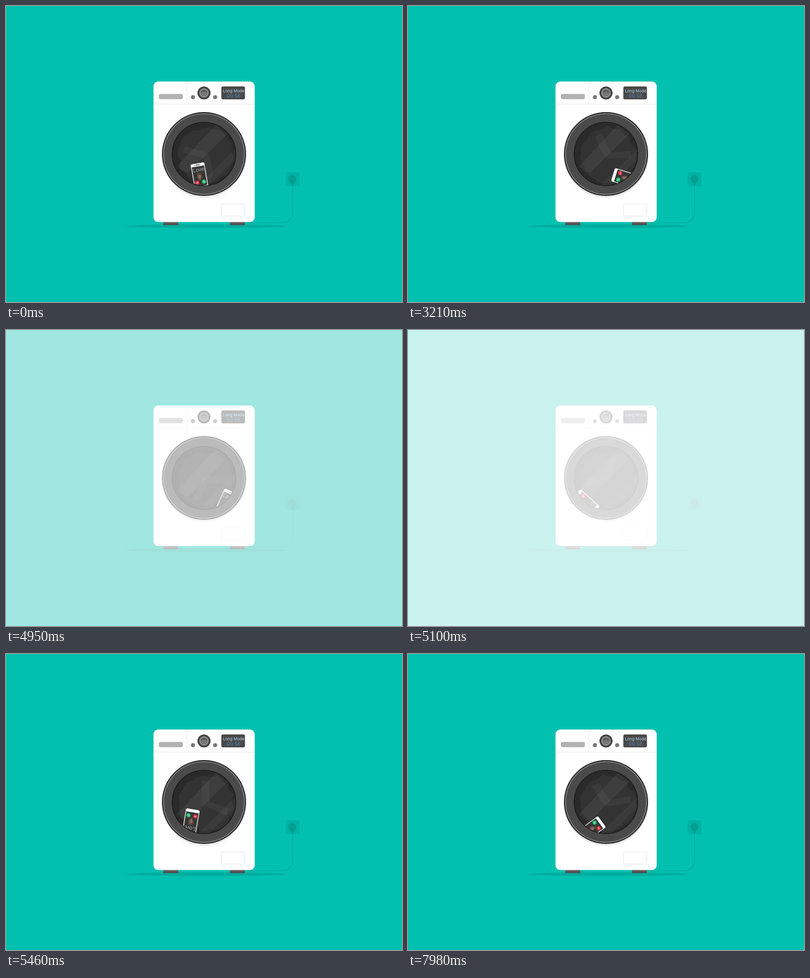
Animation of 800 by 600 pixels, one loop 8 s. Source, as an HTML page without scripts:

```html
<!DOCTYPE html>
<html lang="en">
<head>
<meta charset="utf-8">
<title>Phone in the wash</title>
<style>
  html, body { margin: 0; width: 100%; height: 100%; overflow: hidden; background: #01c0b0; }
  svg { display: block; width: 100vw; height: 100vh; }
  text { font-family: Inter, Roboto, sans-serif; }

  .slide, .spin, .cloth, .fade { animation: 8s linear infinite; }
  .slide { animation-name: slide; animation-timing-function: ease-in-out; }
  .spin { animation-name: spin; }
  .cloth { animation-name: cloth; }
  .fade { animation-name: fade; }

  @keyframes slide {
    0% { transform: translate(391px, 344.6px); }
    10.5% { transform: translate(425px, 350px); }
    19% { transform: translate(387px, 349px); }
    23.625% { transform: translate(433px, 350px); }
    27% { transform: translate(439px, 350px); }
    34% { transform: translate(395px, 349px); }
    40.125% { transform: translate(439px, 349.2px); }
    42.5% { transform: translate(442px, 349px); }
    48% { transform: translate(415px, 346px); }
    51% { transform: translate(432px, 348px); }
    56% { transform: translate(377px, 342px); }
    61.875% { transform: translate(444px, 350.5px); }
    63% { transform: translate(445px, 351px); }
    63.01% { transform: translate(359px, 350px); }
    65.25% { transform: translate(357.4px, 351.5px); }
    72.5% { transform: translate(402px, 321px); }
    77% { transform: translate(424px, 346px); }
    82.125% { transform: translate(360px, 354.3px); }
    86% { transform: translate(392px, 332px); }
    90.5% { transform: translate(423px, 347px); }
    99.75%, 100% { transform: translate(370.7px, 355px); }
  }
  @keyframes spin {
    0% { transform: rotate(-10deg); }
    23.625% { transform: rotate(215deg); }
    40.125% { transform: rotate(467deg); }
    61.875% { transform: rotate(744deg); }
    63% { transform: rotate(758deg); }
    63.01% { transform: rotate(122deg); }
    65.25% { transform: rotate(151deg); }
    82.125% { transform: rotate(368deg); }
    99.75% { transform: rotate(594deg); }
    100% { transform: rotate(597deg); }
  }
  @keyframes cloth {
    0% { transform: rotate(80deg); }
    63% { transform: rotate(1466deg); }
    63.01% { transform: rotate(-928deg); }
    100% { transform: rotate(-120deg); }
  }
  /* quick wash to white, slower return */
  @keyframes fade {
    0%, 60.75% { opacity: 0; }
    62.56%, 63% { opacity: 1; }
    66.7%, 100% { opacity: 0; }
  }
</style>
</head>
<body>
<svg viewBox="0 0 800 600">
  <defs>
    <clipPath id="glass"><circle cx="400" cy="300" r="63.6"/></clipPath>
    <g id="knob"><circle r="4" fill="#757575" stroke="#a4a4a4" stroke-width=".9"/></g>
    <g id="foot">
      <rect width="30" height="6" fill="#665456"/>
      <rect y="4.6" width="30" height="1.4" fill="#4a4243"/>
    </g>
    <path id="handset" d="M-2.4 1Q-2.4-1 0-1T2.4 1L1 .9V0H-1V.9Z" fill="#fff"/>
  </defs>

  <rect width="800" height="600" fill="#01c0b0"/>

  <!-- floor, cable and socket -->
  <ellipse cx="403" cy="446.3" rx="163" ry="3.6" fill="#00ac9e"/>
  <path d="M482 439.5H556Q579 439.5 579 416V360" fill="none" stroke="#00a698" stroke-width="1"/>
  <rect x="565" y="337" width="28" height="28" fill="#00b2a3"/>
  <path d="M571 353A8 8 0 1 1 586.4 353Q584 358 580.5 360V364H577V360Q573 358 571 353Z" fill="#009f92"/>

  <!-- body -->
  <use href="#foot" x="318" y="438"/>
  <use href="#foot" x="452.5" y="438"/>
  <rect x="298.2" y="153.3" width="204" height="284.4" rx="9.5" fill="#fff" stroke="#dceeec" stroke-width=".7"/>
  <path d="M298.5 199H502M365.5 153.5V199" stroke="#e6e6e6" stroke-width="1"/>
  <rect x="309.3" y="178.8" width="47.5" height="9.6" rx="2" fill="#b3b3b3" stroke="#a6a6a6" stroke-width=".8"/>
  <rect x="435.7" y="401" width="46.4" height="25" rx="2" fill="#fff" stroke="#e4e4e4"/>

  <!-- controls -->
  <use href="#knob" x="377.7" y="184.8"/>
  <use href="#knob" x="422.5" y="184.8"/>
  <circle cx="400" cy="176.3" r="12.5" fill="#4a4a4a" stroke="#303030" stroke-width="1.2"/>
  <circle cx="400" cy="176.3" r="8.5" fill="#777" stroke="#c4c4c4" stroke-width="1"/>
  <path d="M392.4 176.5A7.7 7.7 0 0 1 407.6 176.5Q400 171.5 392.4 176.5Z" fill="#5b5b5b"/>
  <path d="M400 167.6V169.6" stroke="#d9474a" stroke-width="1"/>
  <rect x="435.7" y="163.7" width="46.4" height="25" rx="2" fill="#4a4a4a" stroke="#333"/>
  <text x="438.5" y="174.7" font-size="8" fill="#b4d6f4">Long Mode</text>
  <text x="446" y="185.8" font-size="10" fill="#5583b0">00:58</text>

  <!-- door -->
  <circle cx="400" cy="304" r="85" fill="#ebebeb"/>
  <circle cx="400" cy="300" r="84" fill="#4a4a4a" stroke="#2a2a2a" stroke-width="2"/>
  <circle cx="400" cy="300" r="81.6" fill="none" stroke="#8c8c8c" stroke-width="1.4"/>
  <circle cx="400" cy="300" r="64.3" fill="#2a2a2a" stroke="#1b1b1b" stroke-width="1.6"/>

  <g clip-path="url(#glass)">
    <g transform="translate(404 303)">
      <g class="cloth">
        <path d="M56 0Q50 14 55 26Q40 34 36 46Q24 44 16 57Q2 48-10 56Q-24 55-30 46Q-45 45-47 30Q-58 20-52 4Q-60-10-49-24Q-46-42-30-46Q-14-60 2-52Q20-58 30-45Q48-40 48-22Q58-14 56 0Z" fill="#333"/>
        <path d="M0-7Q25-9 46-6V9Q22 6 3 8Q-5 27-13 45L-26 39Q-15 20-8 2Z" fill="#3b3b3b"/>
      </g>
    </g>
    <path d="M424 241L447 260L368 338Q352 336 346 324Z" fill="#fff" opacity=".055"/>
    <path d="M464 289V309L411 363H390Z" fill="#fff" opacity=".045"/>

    <g class="slide"><g class="spin">
      <rect x="-14" y="-26" width="28" height="52" rx="3" fill="#fff"/>
      <rect x="-12.6" y="-19.8" width="25.2" height="39.8" fill="#363636"/>
      <rect x="-4.5" y="-23.6" width="9" height="1.5" rx=".7" fill="#333"/>
      <circle cx="-7" cy="-22.8" r=".8" fill="#444"/>
      <text y="-8.6" font-size="10" font-weight="300" text-anchor="middle" fill="#d4d4d4">Love</text>
      <path d="M-5-1Q-5-7 0-7T5-1Q6 4 3 5L2 9H-3L-3 5Q-6 3-5-1Z" fill="#594842"/>
      <path d="M-3-1Q0-4 3 0Q3 5 0 6T-3-1Z" fill="#8b6b5d"/>
      <g transform="translate(-6.9 12.7)"><circle r="4.3" fill="#e6343d"/><use href="#handset"/></g>
      <g transform="translate(6.9 12.7)"><circle r="4.3" fill="#1fc26b"/><use href="#handset" transform="rotate(-130)"/></g>
    </g></g>
  </g>

  <rect class="fade" width="800" height="600" fill="#fff"/>
</svg>
</body>
</html>
```
